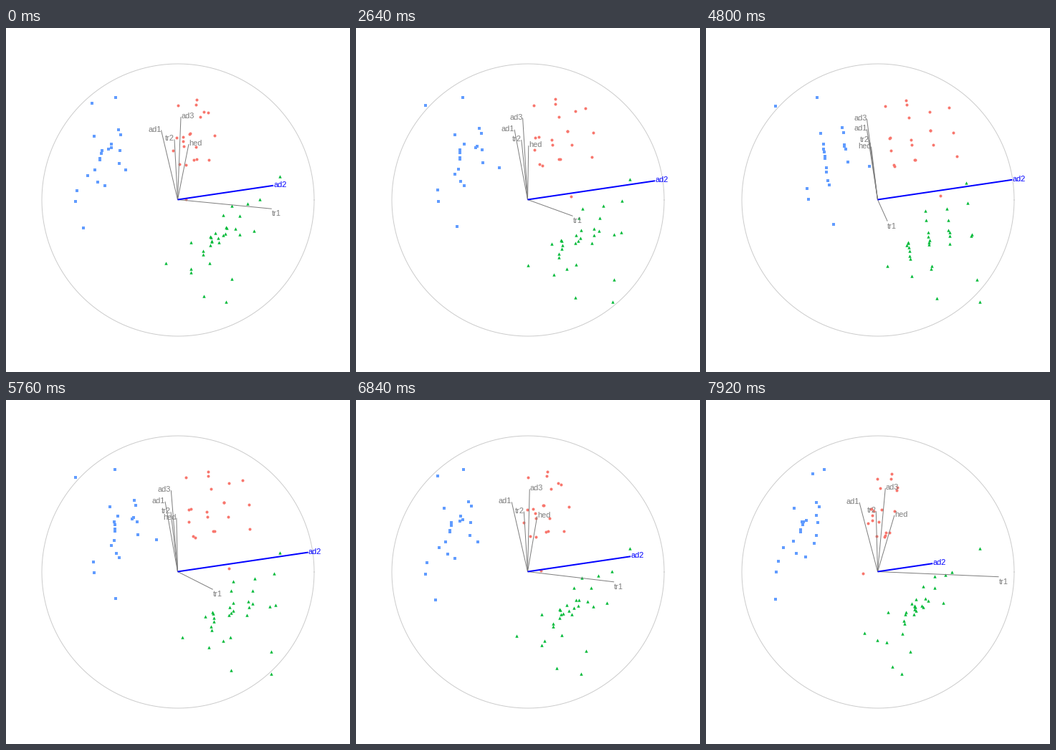
A matplotlib script that plays this animation: 480x480 px, repeating every 8 s.

```python
import numpy as np
import matplotlib.pyplot as plt
from matplotlib.animation import FuncAnimation

SIZE, DPI = 480, 100
PX = 72 / DPI                      # points per pixel
STEP_MS, LOOP_MS = 40, 8000
RADIUS, HALF = 190, 142.5          # unit circle and data box, in pixels
THETA = np.radians(8.4)            # direction of the manipulated axis
C, S = np.cos(THETA), np.sin(THETA)
LEVEL = 30                         # the manipulated variable has whole levels

# Points are (level, w, v): v lies across THETA, level and w rotate along it.
# Each cloud has a mean, a spread, the slope of w on v and a few outliers.
CLOUDS = [
    dict(marker="o", color="#F8766D", size=4, n=18, slope=0.25,
         mean=(6, 152, 99), spread=(0.9, 22, 28),
         outliers=[(6, 171, 150), (7, 85, -2), (8, 118, 54)]),
    dict(marker="^", color="#00BA38", size=4.4, n=26, slope=0.8,
         mean=(6.1, 163, -70), spread=(1, 17, 28),
         outliers=[(8, 268, 12), (8, 217, -19), (8, 129, -137),
                   (6, 123, -157), (8, 109, -171)]),
    dict(marker="s", color="#619CFF", size=4, n=18, slope=0.45,
         mean=(2.3, 60, 70), spread=(0.9, 14, 30),
         outliers=[(0, 124, 168), (2, 117, 172), (1, 32, 36), (2, 4, -24)]),
]

# Axis name: (part along THETA that grows with sin(phi), fixed part across it)
AXES = {"tr1": (182, -31.8), "tr2": (11.1, 83.8), "hed": (37.9, 74.4),
        "ad1": (-12.2, 99.3), "ad3": (30.3, 113.5), "ad2": (0, 0)}
MANIP = "ad2"


def scatter(cloud, rng):
    noise = np.clip(rng.normal(size=(cloud["n"], 3)), -1.7, 1.7)
    points = cloud["mean"] + noise * cloud["spread"]
    points[:, 0] = np.round(points[:, 0])
    points[:, 1] += cloud["slope"] * (points[:, 2] - cloud["mean"][2])
    return np.vstack([points, cloud["outliers"]])


def to_screen(along, across):
    return along * C - across * S, along * S + across * C


def fit(a):
    """Stretch values over the full data box."""
    return ((a - a.min()) / np.ptp(a) * 2 - 1) * HALF


def angle(ms):
    if ms < 4320:
        return 0.78 - 0.05 * max(0, (ms - 480) // 240)
    if ms < 5760:
        return 0.05 * max(0, (ms - 4560) // 240)
    return 0.25 + 0.05 * ((ms - 5760) // 120)


rng = np.random.default_rng(4)
clouds = [scatter(cloud, rng) for cloud in CLOUDS]
level, w, v = np.vstack(clouds).T
splits = np.cumsum([len(points) for points in clouds])[:-1]

plt.rcParams["font.family"] = "Liberation Sans"
fig = plt.figure(figsize=(SIZE / DPI, SIZE / DPI), dpi=DPI, facecolor="white")
ax = fig.add_axes([0, 0, 1, 1])
ax.set(xlim=(-239.5, 240.5), ylim=(-240.5, 239.5))
ax.axis("off")

ring = np.linspace(0, 2 * np.pi, 361)
ax.plot(0.5 + RADIUS * np.cos(ring), RADIUS * np.sin(ring) - 0.5,
        color="#CCCCCC", lw=PX)

dots = [ax.plot([], [], cloud["marker"], color=cloud["color"],
                ms=cloud["size"] * PX, mew=0)[0] for cloud in CLOUDS]
lines, labels = {}, {}
for name in AXES:
    hot = name == MANIP
    color = "#0000FF" if hot else "#7F7F7F"
    lines[name], = ax.plot([], [], color=color, lw=(2 if hot else 1) * PX,
                           solid_capstyle="butt")
    labels[name] = ax.text(0, 0, name, color=color, fontsize=11 * PX)


def place_axis(name, phi):
    grow, across = AXES[name]
    along = RADIUS * np.cos(phi) if name == MANIP else grow * np.sin(phi)
    x, y = to_screen(along, across)
    lines[name].set_data([0, x], [0, y])
    label = labels[name]
    label.set_position((x, y - 2))
    label.set_ha("center" if abs(x) < 0.48 else "left" if x > 0 else "right")
    label.set_va("baseline" if y > 0 else "top")


def update(i):
    phi = angle(i * STEP_MS)
    x, y = to_screen(LEVEL * level * np.cos(phi) + w * np.sin(phi), v)
    parts = zip(np.split(fit(x), splits), np.split(fit(y), splits))
    for dot, (px, py) in zip(dots, parts):
        dot.set_data(px, py)
    for name in AXES:
        place_axis(name, phi)
    return [*dots, *lines.values(), *labels.values()]


anim = FuncAnimation(fig, update, frames=LOOP_MS // STEP_MS, interval=STEP_MS,
                     repeat=True, repeat_delay=0)
plt.show()
```
